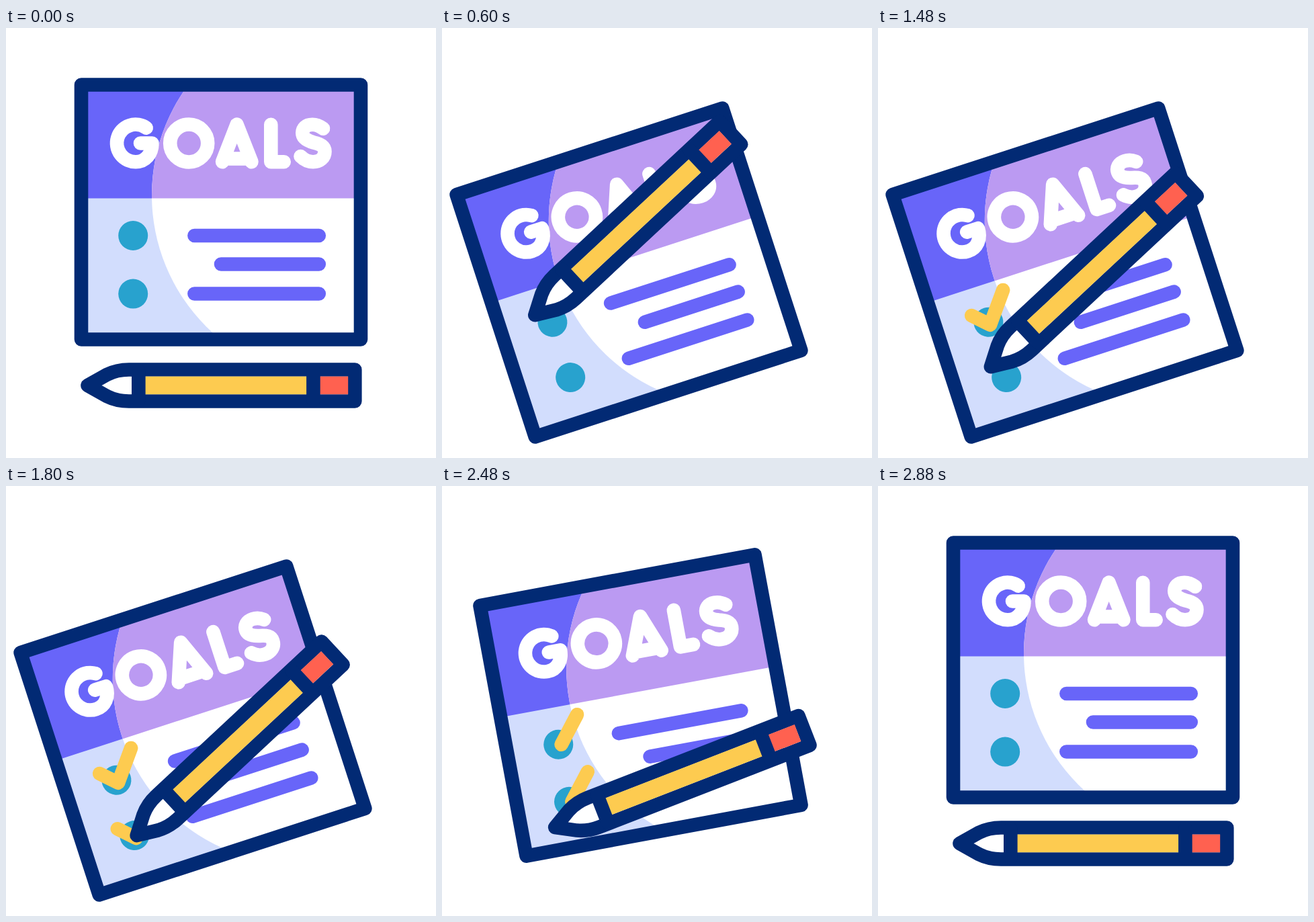
Write an HTML page that moves like this. It is 640 by 640 pixels and loops after 3000 ms.

```html
<!DOCTYPE html>
<html lang="en">
<head>
<meta charset="utf-8">
<title>Goals</title>
<style>
  html, body { margin: 0; width: 100%; height: 100%; overflow: hidden; background: #fff; }
  svg { display: block; width: 100vw; height: 100vh; }
  .line { fill: none; stroke-width: 20.6; stroke-linecap: round; stroke-linejoin: round; }
  .navy { stroke: #022a74; }
  .violet { stroke: #6865f9; }
  .white { stroke: #fff; }
  .tick { stroke: #fdcb50; }
</style>
</head>
<body>
<svg viewBox="0 0 640 640">
  <defs>
    <clipPath id="page"><rect x="112" y="84.5" width="416" height="379"/></clipPath>
    <clipPath id="glow"><circle cx="493" cy="249" r="276"/></clipPath>
  </defs>

  <g id="board">
    <g clip-path="url(#page)">
      <rect x="112" y="84" width="416" height="380" fill="#d2ddfd"/>
      <rect x="112" y="84" width="416" height="169.5" fill="#6865f9"/>
      <g clip-path="url(#glow)">
        <rect x="112" y="84" width="416" height="380" fill="#fff"/>
        <rect x="112" y="84" width="416" height="169.5" fill="#bb9af2"/>
      </g>
    </g>
    <g class="line white" role="img" aria-label="GOALS">
      <path d="M208.7 148.6A27.8 27.8 0 1 0 193.5 199.2C207 199.2 217.5 188 217.5 171.5H200"/>
      <circle cx="272.2" cy="171.5" r="28"/>
      <path d="M322 199.2L343.6 143.7L365.5 199.2M328 194.5H360"/>
      <path d="M394.3 143.7V199.2H413.7"/>
      <path d="M472 149.7C466 145 461 143.7 456 143.7C446 143.7 441.3 149.5 441.3 156C441.3 164 449 168 458 170.5C468 173 474.5 176 474.5 184C474.5 193 467 199.2 457 199.2C449.5 199.2 443.5 196 438.5 191"/>
    </g>
    <g fill="#28a2ce">
      <circle cx="189.2" cy="309" r="22"/>
      <circle cx="189.2" cy="395.6" r="22"/>
    </g>
    <path class="line violet" d="M280.4 309H465.8M320 351.5H465.8M280.4 395.5H465.8"/>
    <path class="line tick" pathLength="1" d="M168.1 292L190.4 313.7L224.6 270.3"/>
    <path class="line tick" pathLength="1" d="M168.1 378.5L190.4 400.2L224.6 356.8"/>
    <rect class="line navy" x="112" y="84.5" width="416" height="379"/>
  </g>

  <g id="pencil">
    <path class="line navy" style="fill:#fff" d="M519.3 508.5H183C170 508.5 160 511 150 516L121.5 532L150 548C160 553 170 555.5 183 555.5H519.3Z"/>
    <rect x="197" y="518.6" width="260" height="26.6" fill="#fdcb50"/>
    <rect x="457" y="518.6" width="52.2" height="26.6" fill="#ff6150"/>
    <path class="line navy" d="M197.3 510V554M457.4 510V554"/>
  </g>
</svg>

<script>
const LOOP = 3000, STEP = 40;
// phase limits: lift, tick one, hop, tick two, return
const LIFT = 80, DRAW1 = 600, HOP = 1240, DRAW2 = 1520, BACK = 2160, END = 2880;
const REST = [121.5, 532];
const TIP1 = [[138.3, 427.3], [166.5, 441.5], [188, 387.5]];
const TIP2 = [[166.7, 511], [193, 524.3], [216, 467]];
const CORNER = 0.36, TILT = -18, LEAN = -43;

const board = document.getElementById('board');
const pencil = document.getElementById('pencil');
const ticks = document.querySelectorAll('.tick');

const span = (t, a, b) => Math.min(1, Math.max(0, (t - a) / (b - a)));
// cubic ease with start and end slopes
const ease = (u, s = 0, e = 0) =>
  s * u * (1 - u) ** 2 + u * u * (3 - 2 * u) - e * u * u * (1 - u);
const mix = (a, b, p) => a + (b - a) * p;
const bow = (p, k) => p + k * p * (1 - p);
const move = (a, b, p, k = 0) => [mix(a[0], b[0], p), mix(a[1], b[1], bow(p, k))];
const along = ([a, b, c], p) =>
  p < CORNER ? move(a, b, p / CORNER) : move(b, c, (p - CORNER) / (1 - CORNER));

function trim(path, from, to) {
  const len = to - from;
  path.style.display = len > 0.001 ? '' : 'none';
  path.style.strokeDasharray = `${len} 3`;
  path.style.strokeDashoffset = -from;
}

function poseBoard(t) {
  const up = ease(span(t, LIFT, DRAW1));
  const back = ease(span(t, BACK, END));
  const x = -42 * (up - back);
  const y = 90 * (bow(up, 2.05) - back);
  board.setAttribute('transform',
    `translate(${x} ${y}) rotate(${TILT * (up - back)} 320 274)`);
}

function posePencil(t, draw1, draw2) {
  const up = ease(span(t, LIFT, DRAW1), 0, 0.6);
  const back = ease(span(t, BACK, END), 0.65);
  let tip;
  if (t < DRAW1) tip = move(REST, TIP1[0], up, 0.3);
  else if (t < HOP) tip = along(TIP1, draw1);
  else if (t < DRAW2) tip = move(TIP1[2], TIP2[0], ease(span(t, HOP, DRAW2)));
  else if (t < BACK) tip = along(TIP2, draw2);
  else tip = move(TIP2[2], REST, back, 0.5);
  pencil.setAttribute('transform',
    `translate(${tip}) rotate(${LEAN * (up - back)}) translate(${-REST[0]} ${-REST[1]})`);
}

function frame() {
  const t = Math.floor((performance.now() % LOOP) / STEP) * STEP;
  const draw1 = ease(span(t, DRAW1, HOP));
  const draw2 = ease(span(t, DRAW2, BACK));
  const wipe = ease(span(t, BACK, END));
  poseBoard(t);
  posePencil(t, draw1, draw2);
  trim(ticks[0], wipe, draw1);
  trim(ticks[1], wipe, draw2);
  requestAnimationFrame(frame);
}
frame();
</script>
</body>
</html>
```
